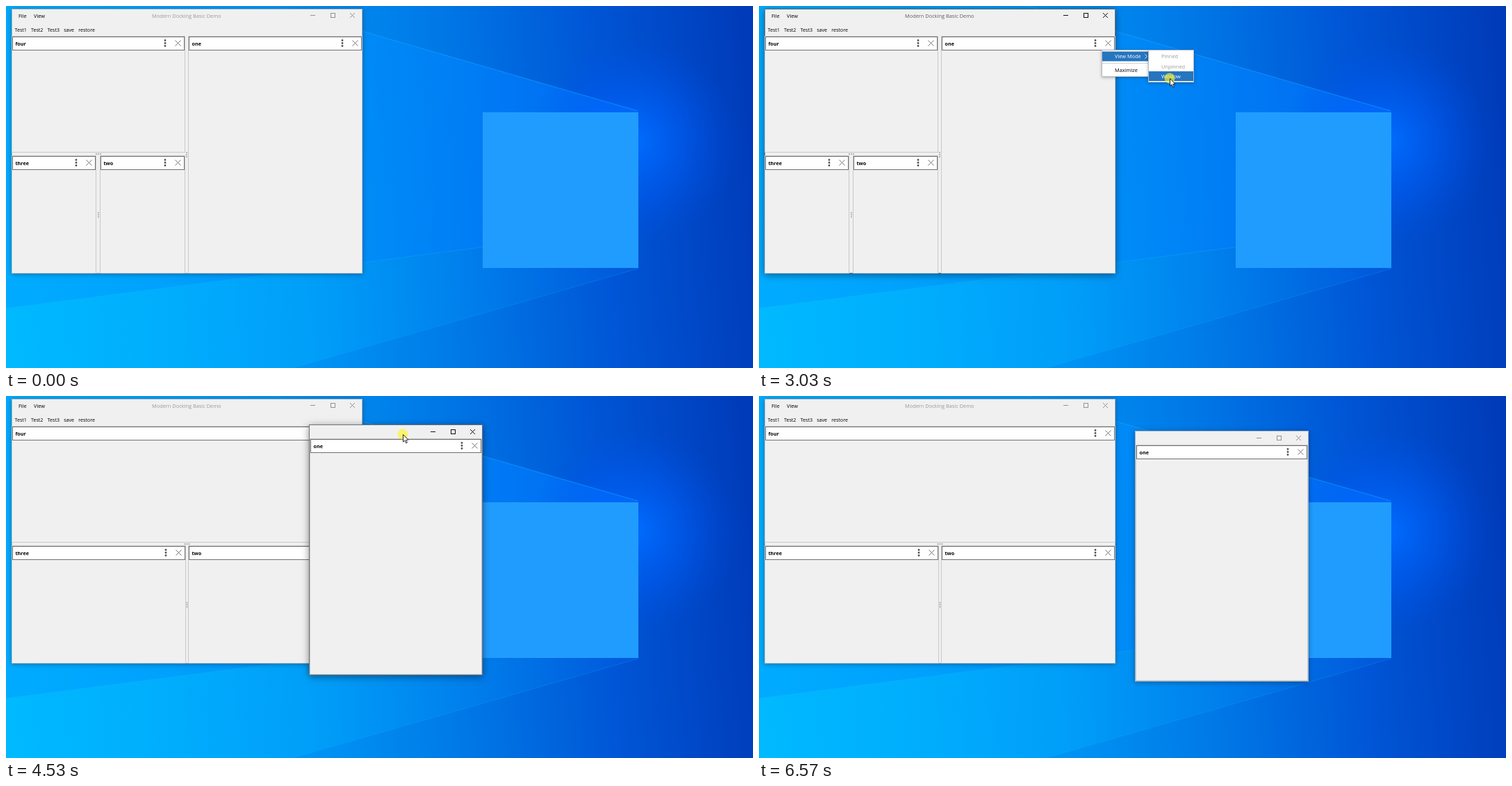
An HTML page with a canvas for the animation above (6.69 s loop, 1075x521 px).

```html
<!DOCTYPE html>
<html lang="en">
<head>
<meta charset="utf-8">
<title>Docking demo</title>
<style>
  html, body { margin: 0; width: 100%; height: 100%; overflow: hidden; background: #0090f6; }
  canvas { display: block; }
</style>
</head>
<body>
<canvas id="stage" width="1075" height="521"></canvas>
<script>
const ctx = document.getElementById('stage').getContext('2d');
const LOOP = 6690;
const FONT = '"Open Sans", "Noto Sans", sans-serif';

// Moments at which the state changes, in ms
const SHOW = 20, ACTIVATE = 1190, MENU = 1270, SUBMENU = 1990, CHOOSE = 3030, MENU_CLOSE = 3060,
      UNDOCK = 3190, DRAG = 4200, DROP = 4800, RELEASE = 5130, LEAVE = 6050, BLUR = 6570;

const smooth = k => k * k * (3 - 2 * k);
const linear = k => k;
const slowDown = k => 1 - (1 - k) ** 1.65;

const ENTRY = { x: 932, y: 492 };
const MOVES = [
  { from: SHOW, to: 660, x: 382, y: 58, ease: smooth },       // onto the header
  { from: 710, to: 950, x: 488, y: 54, ease: smooth },        // to its menu button
  { from: 1590, to: 2210, x: 516, y: 77, ease: smooth },      // to View Mode
  { from: 2280, to: 2820, x: 591, y: 104, ease: smooth },     // to Window
  { from: 3690, to: DRAG, x: 397, y: 38, ease: smooth },      // to the new title bar
  { from: DRAG, to: 4350, x: 431, y: 44, ease: linear },
  { from: 4350, to: DROP, x: 676, y: 64, ease: slowDown },
  { from: 5530, to: LEAVE, x: 1080, y: 526, ease: smooth }
];

function pointerAt(t) {
  let { x, y } = ENTRY;
  for (const move of MOVES) {
    if (t < move.from) break;
    const k = move.ease(Math.min(1, (t - move.from) / (move.to - move.from)));
    x += (move.x - x) * k;
    y += (move.y - y) * k;
  }
  return { x: Math.round(x), y: Math.round(y) };
}

const between = (t, from, to) => t >= from && t < to;

function rect(x, y, w, h, color) {
  ctx.fillStyle = color;
  ctx.fillRect(x, y, w, h);
}

function frame(x, y, w, h, color) {
  ctx.lineWidth = 1;
  ctx.strokeStyle = color;
  ctx.strokeRect(x + .5, y + .5, w - 1, h - 1);
}

function line(color, width, ...points) {
  ctx.strokeStyle = color;
  ctx.lineWidth = width;
  ctx.beginPath();
  points.forEach(([x, y]) => ctx.lineTo(x, y));
  ctx.stroke();
}

function polygon(points, color) {
  ctx.fillStyle = color;
  ctx.beginPath();
  points.forEach(([x, y]) => ctx.lineTo(x, y));
  ctx.fill();
}

function cross(x, y, r, color, width) {
  line(color, width, [x - r, y - r], [x + r, y + r]);
  line(color, width, [x + r, y - r], [x - r, y + r]);
}

function dot(x, y, r, color) {
  ctx.fillStyle = color;
  ctx.beginPath();
  ctx.arc(x, y, r, 0, 7);
  ctx.fill();
}

function dots(x, y, dx, dy, r, color) {
  for (const i of [-1, 0, 1]) dot(x + i * dx, y + i * dy, r, color);
}

function text(str, x, middle, color = '#000', size = 7.4, weight = 400) {
  ctx.font = `${weight} ${size}px ${FONT}`;
  ctx.fillStyle = color;
  ctx.fillText(str, x, middle + 2.7);
  return ctx.measureText(str).width;
}

// Spreads the colours evenly over the gradient
function spread(gradient, ...colors) {
  colors.forEach((color, i) => gradient.addColorStop(i / (colors.length - 1), color));
  return gradient;
}

function shadowed(color, blur, offset, paint) {
  ctx.save();
  ctx.shadowColor = color;
  ctx.shadowBlur = blur;
  ctx.shadowOffsetY = offset;
  paint();
  ctx.restore();
}

function wallpaper() {
  const lightTop = [909, 151], lightBottom = [909, 378], lightCorner = [686, 347];
  const farTop = [0, -112], farMiddle = [0, 435], farBottom = [0, 640];
  const across = () => ctx.createLinearGradient(0, 0, 909, 0);

  rect(0, 0, 1075, 521, spread(ctx.createLinearGradient(0, 330, 1075, 240),
    '#00b0ff', '#00a5fb', '#0093f4', '#0078e6', '#0056d6', '#003cba'));
  polygon([lightTop, farTop, farMiddle, lightCorner, lightBottom], spread(across(),
    'rgba(0,165,255,.4)', 'rgba(0,148,255,.5)', 'rgba(0,112,255,.75)'));
  polygon([lightCorner, farMiddle, farBottom, lightBottom], spread(across(),
    'rgba(0,188,255,.8)', 'rgba(0,168,252,.5)', 'rgba(0,110,240,.2)'));
  rect(755, 45, 320, 300, spread(ctx.createRadialGradient(905, 195, 10, 905, 195, 150),
    'rgba(0,108,255,.9)', 'rgba(0,95,250,.45)', 'rgba(0,80,230,0)'));
  line('rgba(20,160,255,.6)', 1.2, lightTop, farTop);
  line('rgba(20,175,255,.35)', 1, lightCorner, farMiddle);
  line('rgba(20,175,255,.25)', 1, lightBottom, farBottom);
  rect(686, 153, 224, 224, '#209cff');
}

function windowFrame(x, y, w, h, active, buttonY) {
  shadowed(`rgba(0,0,0,${active ? .45 : .35})`, active ? 10 : 7, active ? 2 : 1,
    () => rect(x, y, w, h, '#f0f0f0'));
  frame(x, y, w, h, active ? '#6c747b' : '#a9b5bf');
  const right = x + w, middle = buttonY + .5, color = active ? '#111' : '#929292';
  line(color, 1, [right - 75, middle], [right - 68, middle]);
  frame(right - 46, buttonY - 3, 7, 7, color);
  cross(right - 14.5, middle, 3.5, color, 1);
}

function panel(name, x, y, w, h, hovered) {
  rect(x, y, w, h, '#f0f0f0');
  frame(x, y, w, h, hovered ? '#79b7e6' : '#c9c9c9');
  rect(x + 1, y + 1, w - 2, 19, '#fff');
  frame(x + 1, y + 1, w - 2, 20, '#707070');
  const middle = y + 10.5;
  text(name, x + 5.5, middle + .5, '#000', 7.2, 700);
  dots(x + w - 29, middle, 0, 4, 1.4, '#555');
  cross(x + w - 10.5, middle, 4, '#666', .9);
}

function mainWindow(t, hovered) {
  const docked = t < UNDOCK, active = between(t, ACTIVATE, UNDOCK);
  windowFrame(8, 4, 505, 381, active, 13);
  text('File', 18, 14.5);
  text('View', 40, 14.5);
  text('Modern Docking Basic Demo', 210, 14.5, active ? '#5c5c5c' : '#999');
  let x = 12.5;
  for (const label of ['Test1', 'Test2', 'Test3', 'save', 'restore'])
    x += text(label, x, 34, '#000', 7.1) + 6.2;

  const right = docked ? 258 : 513;           // right edge of the three nested panels
  const half = (right - 8 - 5) >> 1;
  panel('four', 8, 43, right - 8, 168);
  panel('three', 8, 215, half + 1 - docked % 2, 170);
  panel('two', right - half - 1, 215, half + 1, 170);
  dots((right + 8) / 2, 213, 3, 0, .9, '#999');
  dots((right + 8) / 2, 300.5, 0, 3, .9, '#999');
  if (docked) {
    panel('one', 262, 43, 251, 342, hovered);
    dots(260, 214, 0, 3, .9, '#999');
  }
}

function floatingWindow(t, x, y, hovered) {
  ctx.save();
  ctx.globalAlpha = Math.min(1, (t - UNDOCK) / 170);
  windowFrame(x, y, 250, 361, t < BLUR, y + 10);
  panel('one', x + 1, y + 20, 248, 340, hovered);
  ctx.restore();
}

function popup(x, y, w, h) {
  shadowed('rgba(0,0,0,.3)', 4, 1, () => rect(x, y, w, h, '#fff'));
  frame(x, y, w, h, '#b4bcc4');
}

function menuItem(label, x, middle, w, selected, color = '#000') {
  if (selected) rect(x, middle - 7, w, 14, '#2675bf');
  text(label, x + 18, middle, selected ? '#fff' : color);
}

function menus(t, pointer) {
  const onViewMode = pointer.y > 65, onWindow = pointer.x > 560 && pointer.y > 93;
  popup(493, 63, 68, 39);
  menuItem('View Mode', 494, 72.5, 66, onViewMode);
  line(onViewMode ? '#fff' : '#000', .9, [555.5, 69.5], [558.5, 72.5], [555.5, 75.5]);
  rect(494, 82, 66, 1, '#d0d0d0');
  menuItem('Maximize', 494, 92.5, 66, false);
  if (t < SUBMENU) return;
  popup(560, 63, 66, 47);
  menuItem('Pinned', 561, 72.5, 64, false, '#999');
  menuItem('Unpinned', 561, 87, 64, false, '#999');
  menuItem('Window', 561, 101, 64, onWindow);
}

function drawPointer(t, { x, y }) {
  const pressed = between(t, ACTIVATE, 1350) || between(t, CHOOSE, 3150) || between(t, DRAG, RELEASE);
  if (pressed) dot(x, y, 7.5, 'rgba(255,245,40,.65)');
  const arrow = [[0, 0], [0, 10.6], [2.4, 8.4], [4.2, 12.3], [5.9, 11.5], [4.2, 7.8], [7.6, 7.6], [0, 0]]
    .map(([dx, dy]) => [x + .5 + dx, y + .5 + dy]);
  polygon(arrow, '#fff');
  line('#111', .9, ...arrow);
}

function draw(t) {
  const pointer = pointerAt(t), floating = t >= UNDOCK;
  const grip = pointerAt(Math.min(Math.max(t, DRAG), DROP));
  const wx = grip.x - 135, wy = grip.y - 14;

  const [x, y, w, h] = floating ? [wx + 1, wy + 20, 248, 340] : [262, 43, 251, 342];
  const inside = t >= SHOW && between(pointer.x, x, x + w) && between(pointer.y, y, y + h);
  const hovered = inside || between(t, ACTIVATE, 2400);

  wallpaper();
  mainWindow(t, hovered);
  if (floating) floatingWindow(t, wx, wy, hovered);
  if (between(t, MENU, MENU_CLOSE)) menus(t, pointer);
  if (between(t, SHOW, LEAVE)) drawPointer(t, pointer);
}

const start = performance.now();
function tick() {
  draw((performance.now() - start) % LOOP);
  requestAnimationFrame(tick);
}
tick();
</script>
</body>
</html>
```
